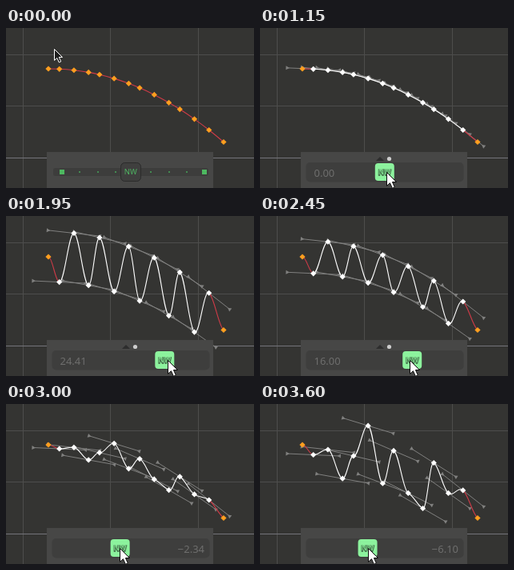
An HTML page with a canvas that plays this animation: 310 by 200 pixels, repeating every 3.75 s.

```html
<!DOCTYPE html>
<html lang="en">
<head>
<meta charset="utf-8">
<title>Curve tween slider</title>
<style>
html, body { margin: 0; width: 100%; height: 100%; overflow: hidden; background: #343432; }
canvas { display: block; width: 310px; height: 200px; }
</style>
</head>
<body>
<canvas id="stage" width="310" height="200"></canvas>
<script>
const ctx = document.getElementById("stage").getContext("2d");
const LOOP = 3750, STEP = 50, DRAG_END = 600, RELEASE = 750, PRESS = 1150;
const FONT = '"Noto Sans", sans-serif';
const WHITE = "#ffffff", HANDLE = "#80807f";
const LAST = 13, SPAN = 48, WIDTH = 219, HEIGHT = 91.5, POWER = 2.06;

// Slider pull as time/amount pairs; the shown value is its signed square
const PULL = [[PRESS, 0], [1600, 2], [1950, 4.941], [2050, 5.55], [2300, 5.55],
  [2450, 4], [3000, -1.53], [3400, -3], [3600, -2.47]];

// Noise direction of each inner key
const NOISE = [2, 0.7, 6.2, 1.1, -5.9, 4.9, -2.7, 4.6, 6.1, -4.6, -0.4, -3.2];

// Keys lie on whole frames along an ease-in curve
const KEYS = Array.from({ length: LAST + 1 }, (_, i) => {
  const u = Math.floor(i * SPAN / LAST) / SPAN;
  const slope = HEIGHT / WIDTH * POWER * u ** (POWER - 1);
  const angle = Math.atan(slope);
  return {
    x: 53 + WIDTH * u, y: 51 + HEIGHT * u ** POWER, slope,
    hx: 32.3 * Math.cos(angle), hy: 32.3 * Math.sin(angle),
    wave: i % 2 ? 1.28 : -1.28,
    noise: NOISE[i - 1],
    inner: i > 0 && i < LAST
  };
});

const mix = (a, b, f) => a + (b - a) * f;

function ease(t, from, to) {
  const u = Math.min(1, Math.max(0, (t - from) / (to - from)));
  return u * u * (3 - 2 * u);
}

function pullAt(t) {
  const next = PULL.findIndex(([time]) => time > t);
  if (next < 0) return PULL[PULL.length - 1][1];
  if (next === 0) return 0;
  const [t0, a] = PULL[next - 1], [t1, b] = PULL[next];
  return mix(a, b, (t - t0) / (t1 - t0));
}

const knobAt = t => 155.8 + 8.6 * pullAt(t);

function cursorAt(t) {
  // While dragging, the knob trails the cursor by one step
  if (t >= PRESS) return [knobAt(t + STEP) + 0.7, 180];
  const drag = ease(t, 50, DRAG_END), travel = ease(t, RELEASE - STEP, PRESS);
  return [mix(mix(60, 257, drag), 157, travel), mix(mix(26, 142, drag), 180, travel)];
}

function rect(color, x, y, w, h) {
  ctx.fillStyle = color;
  ctx.fillRect(x, y, w, h);
}

function roundRect(x, y, w, h, r, fill, stroke) {
  ctx.beginPath();
  ctx.roundRect(x, y, w, h, r);
  ctx.fillStyle = fill;
  ctx.fill();
  if (stroke) {
    ctx.strokeStyle = stroke;
    ctx.lineWidth = 1;
    ctx.stroke();
  }
}

function polygon(color, points) {
  ctx.beginPath();
  points.forEach(([x, y]) => ctx.lineTo(x, y));
  ctx.closePath();
  ctx.fillStyle = color;
  ctx.fill();
}

function diamond(x, y, color) {
  const r = 3.6;
  polygon(color, [[x, y - r], [x + r, y], [x, y + r], [x - r, y]]);
}

function drawGrid() {
  rect("#343432", 0, 0, 310, 200);
  for (const x of [21, 130, 240]) rect("#4d4d4c", x, 0, 1, 200);
  for (const y of [33, 97]) rect("#4d4d4c", 0, y, 310, 1);
  rect("#74747a", 0, 162, 310, 1);
}

function drawHandles(p) {
  ctx.strokeStyle = HANDLE;
  ctx.lineWidth = 1;
  ctx.beginPath();
  ctx.moveTo(p.x - p.hx, p.y - p.hy);
  ctx.lineTo(p.x + p.hx, p.y + p.hy);
  ctx.stroke();
  for (const side of [-1, 1]) {
    ctx.save();
    ctx.translate(p.x + side * p.hx, p.y + side * p.hy);
    ctx.rotate(Math.atan(p.slope));
    ctx.scale(side, 1);
    polygon(HANDLE, [[2, -2.5], [-2.5, 0], [2, 2.5]]);
    ctx.restore();
  }
}

function drawCurve(points, selected) {
  points.slice(1).forEach((b, i) => {
    const a = points[i], reach = 0.37 * (b.x - a.x);
    ctx.beginPath();
    ctx.moveTo(a.x, a.y);
    ctx.bezierCurveTo(a.x + reach, a.y + a.slope * reach,
      b.x - reach, b.y - b.slope * reach, b.x, b.y);
    ctx.strokeStyle = selected && a.inner && b.inner ? WHITE : "#cf3b48";
    ctx.lineWidth = 1.1;
    ctx.stroke();
  });
  for (const p of points) diamond(p.x, p.y, selected && p.inner ? WHITE : "#ff9e1f");
}

function drawMarquee(x, y) {
  ctx.save();
  ctx.setLineDash([3, 3]);
  ctx.strokeStyle = WHITE;
  ctx.lineWidth = 1;
  ctx.strokeRect(62.5, 29.5, x - 62.5, y - 29.5);
  ctx.restore();
}

function drawLabel(x, pressed) {
  ctx.font = `9.5px ${FONT}`;
  ctx.textAlign = "center";
  if (pressed) {
    ctx.strokeStyle = "#47774f";
    ctx.lineWidth = 1.8;
    ctx.lineJoin = "round";
    ctx.strokeText("NW", x, 184);
  }
  ctx.fillStyle = pressed ? "#86e896" : "#4fb562";
  ctx.fillText("NW", x, 183);
}

function drawIdleSlider() {
  roundRect(59, 175, 194, 10, 3, "#3d3d3c");
  for (let i = 0; i <= 8; i++) {
    const size = i % 8 ? 2 : 6;
    rect(i % 8 ? "#438a51" : "#4db860", Math.round(70 + 22.25 * i - size / 2), 180 - size / 2, size, size);
  }
  roundRect(143.5, 168.5, 25, 23, 5, "#3f3f3e", "#2b2b2b");
  drawLabel(155.8, false);
}

function drawActiveSlider(knob, value) {
  roundRect(57.5, 168, 197, 24.5, 5, "#3e3e3d");
  const negative = value < 0;
  if (!negative) {
    polygon("#2d2d2d", [[145, 166], [150, 161], [155, 166]]);
    ctx.beginPath();
    ctx.arc(161.5, 163.5, 2.6, 0, Math.PI * 2);
    ctx.fillStyle = "#cdcdcd";
    ctx.fill();
  }
  ctx.font = `13px ${FONT}`;
  ctx.textAlign = negative ? "right" : "left";
  ctx.fillStyle = "#6e6e6d";
  ctx.fillText((negative ? "\u2212" : "") + Math.abs(value).toFixed(2), negative ? 248 : 67.5, 186);
  roundRect(knob - 12, 169, 24, 22, 4, "#8cf29d");
  drawLabel(knob, true);
}

function drawCursor(x, y, pressed) {
  const size = pressed ? 1.2 : 1;
  const outline = [[0, 0], [0, 14], [3.3, 11], [5.8, 16.5], [8.2, 15.4], [5.8, 10], [10, 10]];
  polygon(pressed ? WHITE : "#1c1c1c",
    outline.map(([px, py]) => [x + 0.5 + px * size, y + 0.5 + py * size]));
  ctx.strokeStyle = pressed ? "#0c0c0c" : WHITE;
  ctx.lineWidth = 1;
  ctx.lineJoin = "round";
  ctx.stroke();
}

function render(time) {
  const t = Math.floor((time % LOOP) / STEP) * STEP;
  const [cx, cy] = cursorAt(t).map(Math.round);
  const pull = pullAt(t);
  const value = pull * Math.abs(pull);
  const selected = t >= RELEASE, pressed = t >= PRESS;
  const points = KEYS.map(k => {
    const shift = value < 0 ? -k.noise * value : k.wave * value;
    return { ...k, y: k.y + (k.inner ? shift : 0) };
  });

  drawGrid();
  if (selected) points.filter(p => p.inner).forEach(drawHandles);
  drawCurve(points, selected);
  rect("#474746", 51, 155, 208, 45);
  if (pressed) drawActiveSlider(knobAt(t), value);
  else drawIdleSlider();
  if (t > 50 && !selected) drawMarquee(cx + 2.5, cy + 5.5);
  drawCursor(cx, cy, pressed);
}

const start = performance.now();
function tick() {
  render(performance.now() - start);
  requestAnimationFrame(tick);
}
tick();
</script>
</body>
</html>
```
